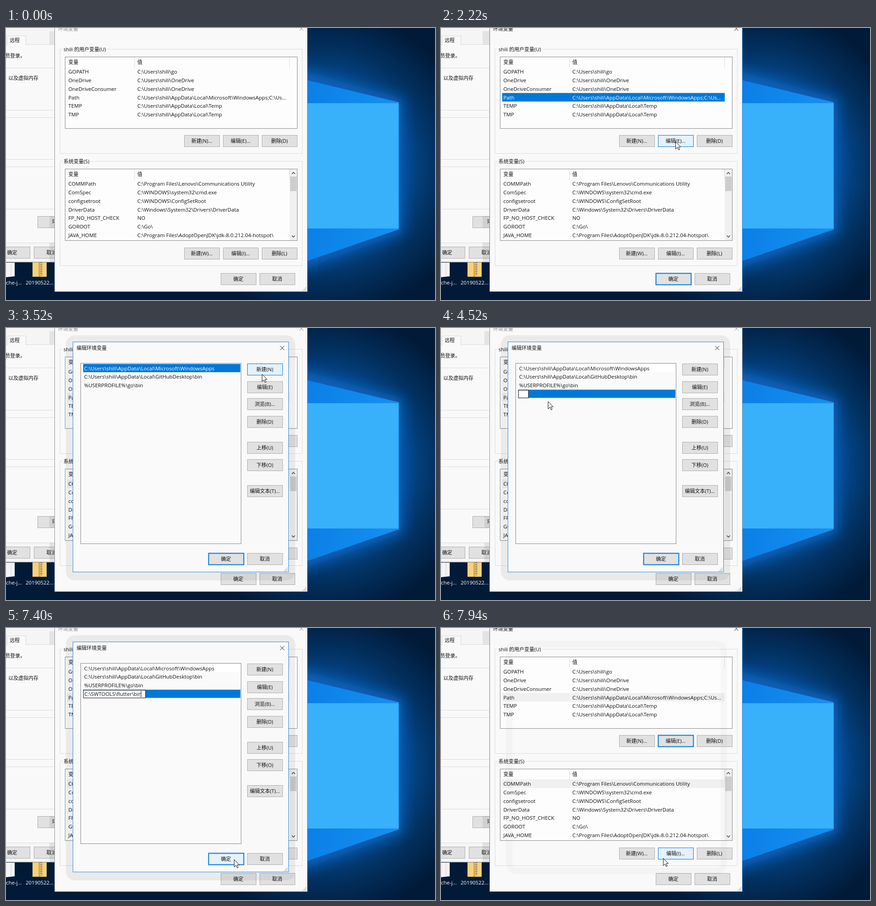
Animation, 939 px wide and 597 px high, one loop 8 s. Source, as an HTML page:

```html
<!DOCTYPE html>
<html lang="zh">
<head>
<meta charset="utf-8">
<title>环境变量</title>
<style>
html, body { margin: 0; width: 100%; height: 100%; overflow: hidden; background: #011a38; }
svg { display: block; width: 100%; height: 100%; }
text { font: 11.4px 'Open Sans', 'Noto Sans CJK SC', 'Noto Sans CJK', sans-serif; fill: #111; white-space: pre; }
text.cjk { font-size: 11px; }
text.label { fill: #fff; }
.mid { text-anchor: middle; }
.btn rect { fill: #e1e1e1; stroke: #adadad; }
.btn.def rect { stroke: #0078d7; stroke-width: 2; }
.btn.hover rect { fill: #e5f1fb; stroke: #0078d7; }
.btn.press rect { fill: #cce4f7; stroke: #005499; }
.list { fill: #fdfdfd; stroke: #828790; }
.row rect { fill: none; }
.row.sel rect { fill: #0078d7; }
.row.sel text { fill: #fff; }
.row.dim rect { fill: #f0f0f0; }
.row.was rect { fill: #fff; }
.line { fill: none; stroke: #dcdcdc; }
.frame { fill: #f9f9f9; stroke: #8d9399; }
.active .frame { stroke: #2a8ad8; }
.title, .x { opacity: .45; }
.active .title, .active .x { opacity: 1; }
.x { fill: none; stroke: #111; }
</style>
</head>
<body>
<svg id="stage" viewBox="0 0 939 597" preserveAspectRatio="none"></svg>
<script>
const LOOP = 8000;
const HOME = 'C:/Users/shili';
const stage = document.getElementById('stage');
const $ = id => document.getElementById(id);
const hits = [];

// Paths are written with "/" and shown with "\".
function text(x, y, s, cls = '') {
  const cjk = /[\u3000-\u9fff]/.test(s) ? 'cjk ' : '';
  return `<text x="${x}" y="${y}" class="${cjk}${cls}">${s.replaceAll('/', '\\')}</text>`;
}

function rect(x, y, w, h, attrs = '') {
  return `<rect x="${x}" y="${y}" width="${w}" height="${h}" ${attrs}/>`;
}

function button(x, y, label, id = '', modal = false) {
  if (id) hits.push({ id, x, y, modal });
  return `<g class="btn" id="${id}">${rect(x + .5, y + .5, 77, 25)}${text(x + 38.5, y + 16.5, label, 'mid')}</g>`;
}

function cross(x, y) {
  return `<path class="x" d="M${x} ${y}l9 9m0 -9l-9 9"/>`;
}

function grip(x, y) {
  let s = '';
  for (let r = 0; r < 3; r++)
    for (let c = 2 - r; c < 3; c++) s += rect(x + c * 3, y + r * 3, 2, 2, 'fill="#bbb"');
  return s;
}

function hlines(ys, x2) {
  return `<path class="line" d="${ys.map(y => `M0 ${y + .5}H${x2}`).join('')}"/>`;
}

function varTable(y, title, rows, prefix) {
  const body = rows.map(([name, value], i) => {
    const base = y + 54.2 + i * 18.8;
    return `<g class="row" id="${prefix}${i}">${rect(134, base - 14, 487, 18.8)}
      ${text(136.5, base, name)}${text(287.5, base, value)}</g>`;
  }).join('');
  const gap = title.length > 10 ? 98 : 62;
  return rect(118.5, y + .5, 530, 229, 'class="line"') + rect(123, y - 4, gap, 9, 'fill="#f9f9f9"') +
    text(126, y + 4.5, title) + rect(129.5, y + 17.5, 508, 157, 'class="list"') +
    `<path class="line" d="M281.5 ${y + 18}v23M620.5 ${y + 18}v23"/>` +
    text(136.5, y + 33, '变量') + text(287.5, y + 33, '值') + body;
}

function desktop() {
  return `<defs>
    <radialGradient id="sky" gradientUnits="userSpaceOnUse" cx="690" cy="300" r="340">
      <stop offset="0" stop-color="#0a6cc6"/><stop offset=".5" stop-color="#054d97"/>
      <stop offset=".75" stop-color="#02305f"/><stop offset="1" stop-color="#011a38"/>
    </radialGradient>
    <linearGradient id="beam"><stop offset="0" stop-color="#0a7ee6"/><stop offset="1" stop-color="#1590f0"/></linearGradient>
    <filter id="soft" x="-30%" y="-30%" width="160%" height="160%"><feGaussianBlur stdDeviation="14"/></filter>
    </defs>
    ${rect(0, 0, 939, 597, 'fill="url(#sky)"')}
    <path d="M620 85L868 155V450L620 540Z" fill="#0a62bd" filter="url(#soft)"/>
    <path d="M640 110L860 163V442L640 518Z" fill="url(#beam)"/>
    ${rect(584, 165, 275, 275, 'fill="#38b0fa"')}
    <path d="M0 515H19V545L0 547Z" fill="#f4f4f4"/><path d="M11 515V545" stroke="#cfcfcf"/>
    ${rect(58, 512, 31, 34, 'fill="#f6d27a"')}${rect(71, 512, 4, 34, 'fill="#dba94a"')}
    <path d="M77.5 514V543" stroke="#777" stroke-width="4" stroke-dasharray="2 2"/>
    ${text(0, 563, 'che-j...', 'label')}${text(43, 563, '20190522...', 'label')}`;
}

function backWindow() {
  return rect(-2, -2, 140, 516, 'fill="#f5f5f5" stroke="#777"') + rect(0, 37, 138, 434, 'fill="#f9f9f9"') +
    hlines([36, 87, 180, 196, 288, 304, 397, 471], 138) +
    rect(2.5, 17.5, 41, 20, 'fill="#f9f9f9" stroke="#d9d9d9"') + rect(3, 36, 40, 3, 'fill="#f9f9f9"') +
    text(8, 30.5, '远程') + text(-2, 64.5, '员登录。') + text(5, 114, '以及虚拟内存') +
    button(69, 413, '') + text(101, 429, '环') + button(-25, 480, '确定') + button(61, 480, '取消') +
    `<g id="edge" fill="#000" opacity=".07">${rect(0, 7, 20, 29)}${rect(0, 413, 20, 25)}${rect(0, 471, 20, 43)}</g>`;
}

function mainWindow() {
  const user = [
    ['GOPATH', HOME + '/go'],
    ['OneDrive', HOME + '/OneDrive'],
    ['OneDriveConsumer', HOME + '/OneDrive'],
    ['Path', HOME + '/AppData/Local/Microsoft/WindowsApps;C:/Us...'],
    ['TEMP', HOME + '/AppData/Local/Temp'],
    ['TMP', HOME + '/AppData/Local/Temp']
  ];
  const system = [
    ['COMMPath', 'C:/Program Files/Lenovo/Communications Utility'],
    ['ComSpec', 'C:/WINDOWS/system32/cmd.exe'],
    ['configsetroot', 'C:/WINDOWS/ConfigSetRoot'],
    ['DriverData', 'C:/Windows/System32/Drivers/DriverData'],
    ['FP_NO_HOST_CHECK', 'NO'],
    ['GOROOT', 'C:/Go/'],
    ['JAVA_HOME', 'C:/Program Files/AdoptOpenJDK/jdk-8.0.212.04-hotspot/']
  ];
  return `<g id="main">${rect(106.5, -20, 553, 598.5, 'class="frame"')}
    ${text(114, 5.5, '环境变量', 'title')}${cross(642, -3)}
    ${varTable(46, 'shili 的用户变量(U)', user, 'user')}
    ${button(390, 235, '新建(N)...', 'newUser')}${button(475, 235, '编辑(E)...', 'editUser')}${button(560, 235, '删除(D)', 'delUser')}
    ${varTable(292, '系统变量(S)', system, 'sys')}
    ${rect(621, 310, 16, 156, 'fill="#f0f0f0"')}${rect(622, 326, 14, 32, 'fill="#cdcdcd"')}
    <path d="M625.5 320.5l3.5 -3.5l3.5 3.5M625.5 455.5l3.5 3.5l3.5 -3.5" fill="none" stroke="#505050" stroke-width="1.6"/>
    ${button(390, 482, '新建(W)...', 'newSys')}${button(475, 482, '编辑(I)...', 'editSys')}${button(560, 482, '删除(L)', 'delSys')}
    ${button(470, 538, '确定', 'mainOk')}${button(555, 538, '取消')}
    ${grip(649, 569)}</g>`;
}

function dialog() {
  const items = [HOME + '/AppData/Local/Microsoft/WindowsApps',
    HOME + '/AppData/Local/GitHubDesktop/bin', '%USERPROFILE%/go/bin', ''];
  const rows = items.map((s, i) =>
    `<g class="row" id="item${i}">${rect(169, 79 + i * 18.8, 344, 18)}${text(171, 92.5 + i * 18.8, s)}</g>`).join('');
  const side = [[117, '编辑(E)'], [154, '浏览(B)...'], [193, '删除(D)'],
    [250, '上移(U)'], [288, '下移(O)'], [345, '编辑文本(T)...']];
  return `<g id="dialog" class="active">
    ${rect(131, 16, 502, 538, 'rx="20" fill="#000" opacity=".06"')}
    ${rect(146.5, 30.5, 472, 505, 'class="frame"')}
    ${text(154.5, 48, '编辑环境变量', 'title')}${cross(600, 39.5)}
    ${rect(163.5, 77.5, 351, 396, 'class="list" style="fill:#fafafa"')}${rows}
    <g id="editor">${rect(169.5, 136.5, 22, 17, 'id="field" fill="#fff" stroke="#111"')}
    <g id="typed">${text(171.5, 149, 'C:/SWTOOLS/flutter/bin')}</g>
    ${rect(171, 138, 1, 14, 'id="caret"')}</g>
    ${button(528, 78, '新建(N)', 'add', true)}${side.map(([y, s]) => button(528, y, s)).join('')}
    ${button(443, 494, '确定', 'ok', true)}${button(528, 494, '取消')}
    ${grip(608, 526)}</g>`;
}

stage.innerHTML = desktop() + backWindow() + mainWindow() +
  rect(149, 35, 470, 498, 'id="ring" rx="16" fill="none" stroke="#000" stroke-width="14" opacity=".025"') +
  dialog() +
  `<path id="cursor" d="M.5 .5V16.5L4.2 13L7 18.7L9.4 17.6L6.7 12H11.6Z" fill="#fff" stroke="#111"/>`;

// Pointer moves: start, end, number of steps, points along the way.
const moves = [
  [520, 1050, 8, [[761, 401], [600, 302], [464, 217], [385, 170], [347, 147]]],
  [1530, 2220, 10, [[348, 148], [368, 158], [392, 160], [486, 172], [510, 225], [513, 249]]],
  [3060, 3760, 10, [[513, 240], [514, 143], [555, 105], [562, 99], [562, 99]]],
  [4290, 4680, 6, [[540, 103], [420, 118], [310, 137], [234, 161], [214, 195], [204, 213]]],
  [4830, 5230, 6, [[203, 218], [193, 250], [178, 278], [158, 335], [140, 390], [137, 407]]],
  [5460, 5530, 2, [[136, 407], [136, 407]]],
  [6460, 7250, 11, [[140, 403], [207, 353], [250, 325], [271, 303], [365, 291], [483, 386], [492, 455], [494, 490]]],
  [7330, 7940, 9, [[499, 508], [499, 508], [497, 507], [488, 505], [486, 505]]]
];

// The margin absorbs start times rounded to 10 ms.
function stepOf(t, start, end, n) {
  return Math.min(n - 1, Math.floor((t - start) * (n - 1) / (end - start) + .1));
}

function pointer(t) {
  const move = moves.findLast(m => m[0] <= t);
  if (!move) return null;
  const [start, end, n, pts] = move;
  const f = stepOf(t, start, end, n) / (n - 1) * (pts.length - 1);
  const i = Math.min(pts.length - 2, Math.floor(f));
  return [0, 1].map(k => Math.round(pts[i][k] + (pts[i + 1][k] - pts[i][k]) * (f - i)));
}

function setClass(id, base, flags) {
  $(id).setAttribute('class', [base, ...Object.keys(flags).filter(k => flags[k])].join(' '));
}

function show(id, on) {
  $(id).style.display = on ? '' : 'none';
}

function fade(t) {
  if (t < 2370) return [0, 1];
  if (t < 7480) {
    const p = Math.min(1, stepOf(t, 2370, 2830, 7) / 4.5);
    return [p, 1 - .1 * (1 - p) ** 1.64];
  }
  const p = Math.max(0, 1 - (stepOf(t, 7330, 7940, 9) - 1) / 4.5);
  return [p, 1 - .07 * (1 - p)];
}

function render(t) {
  const modal = t >= 2370 && t < 7480;
  const closed = t >= 7480;
  const active = t >= 1220 && !modal;
  const pressed = t >= 3760 && t < 3910;
  const editing = t >= 3910;
  const pasted = t >= 6010;

  setClass('main', '', { active });
  $('edge').setAttribute('transform', `translate(${active ? 91 : 95} 0)`);
  setClass('user3', 'row', { sel: t >= 1220 && t < 2370, dim: t >= 2370 });
  setClass('sys0', 'row', { dim: t >= 2370 });

  const [alpha, scale] = fade(t);
  show('dialog', alpha > 0);
  show('ring', closed && alpha === 0);
  $('dialog').setAttribute('opacity', alpha);
  $('dialog').setAttribute('transform', `translate(382.5 283) scale(${scale}) translate(-382.5 -283)`);

  setClass('item0', 'row', { sel: t < 3760, dim: pressed, was: editing });
  setClass('item3', 'row', { sel: editing });
  show('editor', editing);
  show('typed', pasted);
  $('field').setAttribute('width', pasted ? 136 : 22);
  $('caret').setAttribute('x', pasted ? 295 : 171);
  show('caret', Math.floor((t - (pasted ? 6010 : 3910)) / 530) % 2 === 0);

  const tip = pointer(t);
  show('cursor', tip);
  if (tip) $('cursor').setAttribute('transform', `translate(${tip})`);

  const defaults = { mainOk: active && !closed, editUser: closed, ok: !pressed };
  for (const b of hits) {
    const hover = tip && b.modal === modal && tip[0] >= b.x && tip[0] <= b.x + 77 &&
      tip[1] >= b.y && tip[1] <= b.y + 26;
    setClass(b.id, 'btn', { def: defaults[b.id], hover, press: b.id === 'add' && pressed });
  }
}

const begin = performance.now();
function tick() {
  render((performance.now() - begin) % LOOP);
  requestAnimationFrame(tick);
}
tick();
</script>
</body>
</html>
```
